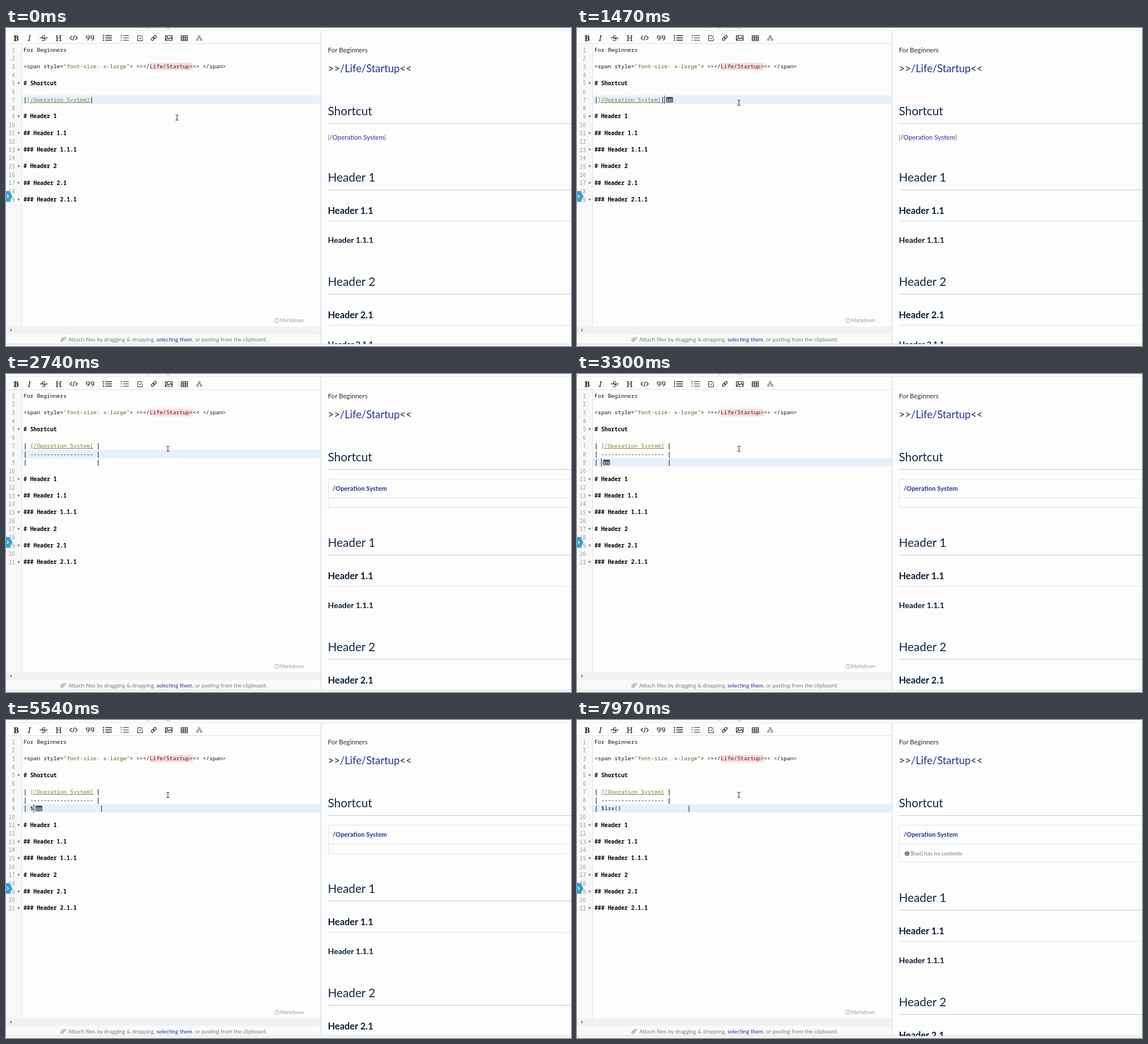
An HTML page for the animation above (8 s loop, 998 by 561 pixels).

```html
<!DOCTYPE html>
<html lang="en">
<head>
<meta charset="utf-8">
<title>Markdown editor</title>
<style>
  html, body { margin: 0; width: 100%; height: 100%; overflow: hidden; background: #fdfdfd; }
  svg { display: block; width: 998px; height: 561px; }
  text { white-space: pre; }
  .code { font: 9.778px "Noto Sans Mono", "DejaVu Sans Mono", monospace; fill: #111; }
  .code .b { font-weight: 700; fill: #000; }
  .code .bar { font-weight: 600; fill: #1a1f2a; }
  .str { fill: #6b6430; }
  .err { fill: #4a1c28; }
  .link { fill: #86803c; text-decoration: underline; }
  .num { font: 11.2px "Noto Sans Mono CJK JP", "Noto Sans CJK JP", monospace; fill: #a2a2a2; text-anchor: end; }
  .view, .ui { font-family: Lato, sans-serif; font-size: 11.6px; fill: #222f3e; }
  .ui { font-size: 9.86px; fill: #777d84; }
  .view .h1 { font-size: 20.75px; fill: #112744; }
  .view .h2 { font-size: 16.4px; font-weight: 700; fill: #0c1f33; }
  .view .h3 { font-size: 14.08px; font-weight: 700; fill: #0c1f33; }
  .view .big { font-size: 18.4px; }
  .view .th { font-size: 11.3px; font-weight: 700; }
  .view .note { font-size: 9.7px; fill: #777d84; }
  .view .a, .a { fill: #27309a; }
  .icons { fill: none; stroke: #25282c; stroke-width: 1.2; }
  .icons text { stroke: none; fill: #1d2024; font: 14px "Noto Serif", serif; text-anchor: middle; }
  #mouse { animation: move 8s infinite; }
  #caret { animation: blink 8s step-end infinite; }
  @keyframes move {
    0%, 1% { transform: translate(302px, 158px); animation-timing-function: ease-in-out; }
    10%, 100% { transform: translate(286px, 132px); }
  }
  @keyframes blink {
    0%, 8.875%, 28.75%, 43.875%, 57.125%, 98.875%, 100% { opacity: 0; }
    2.25%, 15.5%, 35.375%, 50.5%, 63.75% { opacity: 1; }
  }
</style>
</head>
<body>
<svg viewBox="0 0 998 561">
  <defs>
    <clipPath id="pane"><rect x="557" y="5" width="441" height="552.5"/></clipPath>
  </defs>
  <rect width="998" height="561" fill="#fdfdfd"/>
  <rect y="28" width="27.5" height="498" fill="#f8f8f8"/>
  <rect y="526.5" width="556" height="13.5" fill="#f1f1f0"/>
  <rect y="540" width="556" height="17" fill="#fafafa"/>
  <rect y="558" width="998" height="3" fill="#f8f8f9"/>
  <path d="M27.5 28V526" stroke="#e2e2e2"/>
  <path d="M0 4.5H998M76.5 0V4M148.5 0V4" stroke="#e4e6e8" fill="none"/>
  <path d="M0 27.5H556" stroke="#dfe1e4"/>
  <path d="M556.5 5V558M0 557.5H998" stroke="#d3d6da" fill="none"/>
  <text class="ui" x="232" y="0" style="fill:#bbb">/ Page (3, 4) ...</text>
  <circle cx="287" cy="-1" r="3" fill="none" stroke="#bbb"/>

  <g class="icons">
    <text x="18" y="22.5" style="font-weight:700">B</text>
    <text x="41" y="22.5" style="font-style:italic">I</text>
    <text x="66.5" y="22.5">S</text>
    <path d="M59.5 17.5H73.5"/>
    <text x="93" y="22.5">H</text>
    <path d="M116.5 14L113 17.5L116.5 21M122.5 14L126 17.5L122.5 21M120.8 13L118.3 22"/>
    <path d="M147 14H142V18H147ZM147 17Q147 21 143.5 21.5M155 14H150V18H155ZM155 17Q155 21 151.5 21.5"/>
    <path d="M175.5 13.5H187M175.5 17.5H187M175.5 21.5H187" stroke-width="1.5"/>
    <path d="M171 13.5h2.2M171 17.5h2.2M171 21.5h2.2" stroke-width="2"/>
    <path d="M207 13.5H217M207 17.5H217M207 21.5H217"/>
    <path d="M203.5 12v3M202.5 17.5h2M202.5 21.5h2" stroke-width="1"/>
    <path d="M239 13.5H232.5V22.5H241V18M234.5 17.3L236.7 19.5L241.5 13.3" stroke-width="1"/>
    <g transform="rotate(-45 261 17.5)">
      <rect x="255.5" y="15.6" width="6" height="3.8" rx="1.9"/>
      <rect x="260.5" y="15.6" width="6" height="3.8" rx="1.9"/>
    </g>
    <path d="M281.5 13.5H293.5V22H281.5ZM282 21L285.5 17.5L287.5 19.5L290.5 16.5L293 19.5"/>
    <circle cx="284.5" cy="15.8" r=".6"/>
    <path d="M309.5 13.5H320.5V22.5H309.5ZM309.5 16.5H320.5M309.5 19.5H320.5M313.2 14V22.5M316.9 14V22.5"/>
    <path d="M339.5 13.5h3.5v2.5h-3.5zM336.5 19.5h3v2.5h-3zM343 19.5h3v2.5h-3zM341.3 16v1.7M338 19.5V17.7H344.5V19.5" stroke="#666" stroke-width=".9"/>
  </g>

  <rect id="active" x="28" width="528" height="14.67" fill="#e6f0fa"/>
  <g id="code" class="code"></g>
  <path d="M0 287.5H6L11.5 297L6 306.5H0Z" fill="#2ea3d6"/>
  <path d="M1.5 294.5L4.5 297L1.5 299.5" fill="none" stroke="#fff" stroke-width="1.2"/>
  <g id="caret" fill="none" stroke="#15181c">
    <path d="M.4 -7.3V7"/>
    <path d="M4 -4H14.8V4.2H4Z"/>
    <path d="M4 -.8H14.8M4 1.7H14.8M7.6 -3V4M11.2 -3V4" stroke-width=".8"/>
    <path d="M4 -3.3H14.8" stroke-width="1.8"/>
  </g>

  <g class="ui">
    <circle cx="478.5" cy="515.8" r="4" fill="none" stroke="#aaa" stroke-width=".9"/>
    <text x="478.5" y="518.6" text-anchor="middle" style="font-size:7px;fill:#999">?</text>
    <text x="484" y="519" style="font-size:9.1px;fill:#a0a0a0">Markdown</text>
    <path d="M10 530V536L6.5 533Z" fill="#8a8a8a"/>
    <path transform="translate(101 549) rotate(45)" d="M-2.3 -2V3A2.3 2.3 0 0 0 2.3 3V-3.5A1.6 1.6 0 0 0 -.9 -3.5V2.3A.7 .7 0 0 0 .8 2.3V-2" fill="none" stroke="#777" stroke-width=".9"/>
    <text x="110" y="553">Attach files by dragging &amp; dropping, <tspan class="a">selecting them</tspan>, or pasting from the clipboard.</text>
  </g>

  <g class="view" clip-path="url(#pane)">
    <text x="568.5" y="42.5">For Beginners</text>
    <text class="big" x="568.5" y="77.5">&gt;&gt;<tspan class="a">/Life/Startup</tspan>&lt;&lt;</text>
    <text class="h1" x="568.5" y="154">Shortcut</text>
    <path d="M569 168.5H998" stroke="#c3c6cc"/>
    <g id="block"></g>
    <g id="rest"></g>
  </g>
  <path id="mouse" d="M-2.5 -4.5H-.6L0 -4L.6 -4.5H2.5M0 -4V4M-2.5 4.5H-.6L0 4L.6 4.5H2.5" fill="none" stroke="#222"/>
</svg>

<script>
const LOOP = 8000, CHAR = 5.867, LINE = 14.667, LEFT = 31;
const $ = id => document.getElementById(id);
const esc = s => s.replace(/&/g, '&amp;').replace(/</g, '&lt;').replace(/>/g, '&gt;');
const span = (cls, s) => `<tspan class="${cls}">${esc(s)}</tspan>`;
const at = (steps, t) => steps.filter(s => s[0] <= t).pop();

// time, active line, caret column, cell text (null: table not made yet)
const edits = [
  [0, 7, 21, null], [1770, 8, 2, ''], [2980, 9, 2, ''],
  [5420, 9, 3, '$'], [5900, 9, 4, '$l'], [6270, 9, 5, '$ls'],
  [6820, 9, 6, '$lsx'], [7380, 9, 7, '$lsx()']
];
// time, rendered cell
const renders = [
  [0, null], [1950, ''], [5640, '$'], [6100, '$l'],
  [6470, '$ls'], [7020, '$lsx'], [7600, '$lsx()']
];

const bar = span('bar', '|');
const link = span('link', '[/Operation System]');
const heads = ['# Header 1', '## Header 1.1', '### Header 1.1.1',
               '# Header 2', '## Header 2.1', '### Header 2.1.1'];
const intro = [
  'For Beginners', '',
  esc('<span style=') + span('str', '"font-size: x-large"') + esc('> >></') +
    span('err', 'Life/Startup>') + esc('<< </span>'),
  '', '# Shortcut', ''
];

function drawCode([, row, col, cell]) {
  const table = cell === null ? [bar + link + bar]
    : [link, '-'.repeat(19), cell + ' '.repeat(19)].map(s => `${bar} ${s} ${bar}`);
  const lines = [...intro, ...table, ...heads.flatMap(h => ['', h])];
  let out = `<rect x="${LEFT + 38 * CHAR}" y="61.5" width="${13 * CHAR}" height="13" fill="#fadcdc"/>`;
  lines.forEach((s, i) => {
    const y = 42 + i * LINE, head = s[0] === '#';
    out += `<text class="num" x="15.8" y="${y + .7}">${i + 1}</text>`;
    if (head) out += `<path d="M20 ${y - 5}h4.6l-2.3 3.8z" fill="#777"/>`;
    if (s) out += `<text x="${LEFT}" y="${y}"${head ? ' class="b"' : ''}>${s}</text>`;
  });
  $('code').innerHTML = out;
  const top = 31.3 + (row - 1) * LINE;
  $('active').setAttribute('y', top);
  $('caret').setAttribute('transform', `translate(${LEFT + col * CHAR} ${top + LINE / 2})`);
}

function drawView([, cell]) {
  const bottom = cell ? 250.5 : 235.5;
  let out = '';
  if (cell === null) {
    out = '<text x="568.5" y="197" fill="#9a4a2c">|<tspan class="a">/Operation System</tspan>|</text>';
  } else {
    out = `<path d="M999 185.5H569.5V${bottom}H999M569.5 218.5H999" fill="none" stroke="#dfe2e6"/>
      <text class="a th" x="577" y="206">/Operation System</text>`;
    if (cell === '$lsx()') {
      out += `<circle cx="583" cy="235.8" r="4" fill="#5c6670"/>
        <path d="M583 233v1.4M583 235.3v3" stroke="#fff" stroke-width="1.3"/>
        <text class="note" x="589" y="239">$lsx() has no contents</text>`;
    } else if (cell) {
      out += `<text x="577" y="239">${cell}</text>`;
    }
  }
  $('block').innerHTML = out;
  $('rest').setAttribute('transform', `translate(0 ${cell === null ? 0 : cell ? 50 : 34})`);
}

$('rest').innerHTML = [1, 2].map(n => {
  const y = (n - 1) * 184;
  const title = (cls, base, s) => `<text class="${cls}" x="568.5" y="${base + y}">Header ${s}</text>`;
  return title('h1', 271, n) + title('h2', 327.5, n + '.1') + title('h3', 379, n + '.1.1') +
    `<path d="M569 ${285.5 + y}H998" stroke="#c3c6cc"/><path d="M569 ${340.5 + y}H998" stroke="#d9dce2"/>`;
}).join('');

let start, edit, view;
function frame(now) {
  start ??= now;
  const t = (now - start) % LOOP;
  const e = at(edits, t), v = at(renders, t);
  if (e !== edit) drawCode(edit = e);
  if (v !== view) drawView(view = v);
  requestAnimationFrame(frame);
}
drawCode(edit = edits[0]);
drawView(view = renders[0]);
requestAnimationFrame(frame);
</script>
</body>
</html>
```
